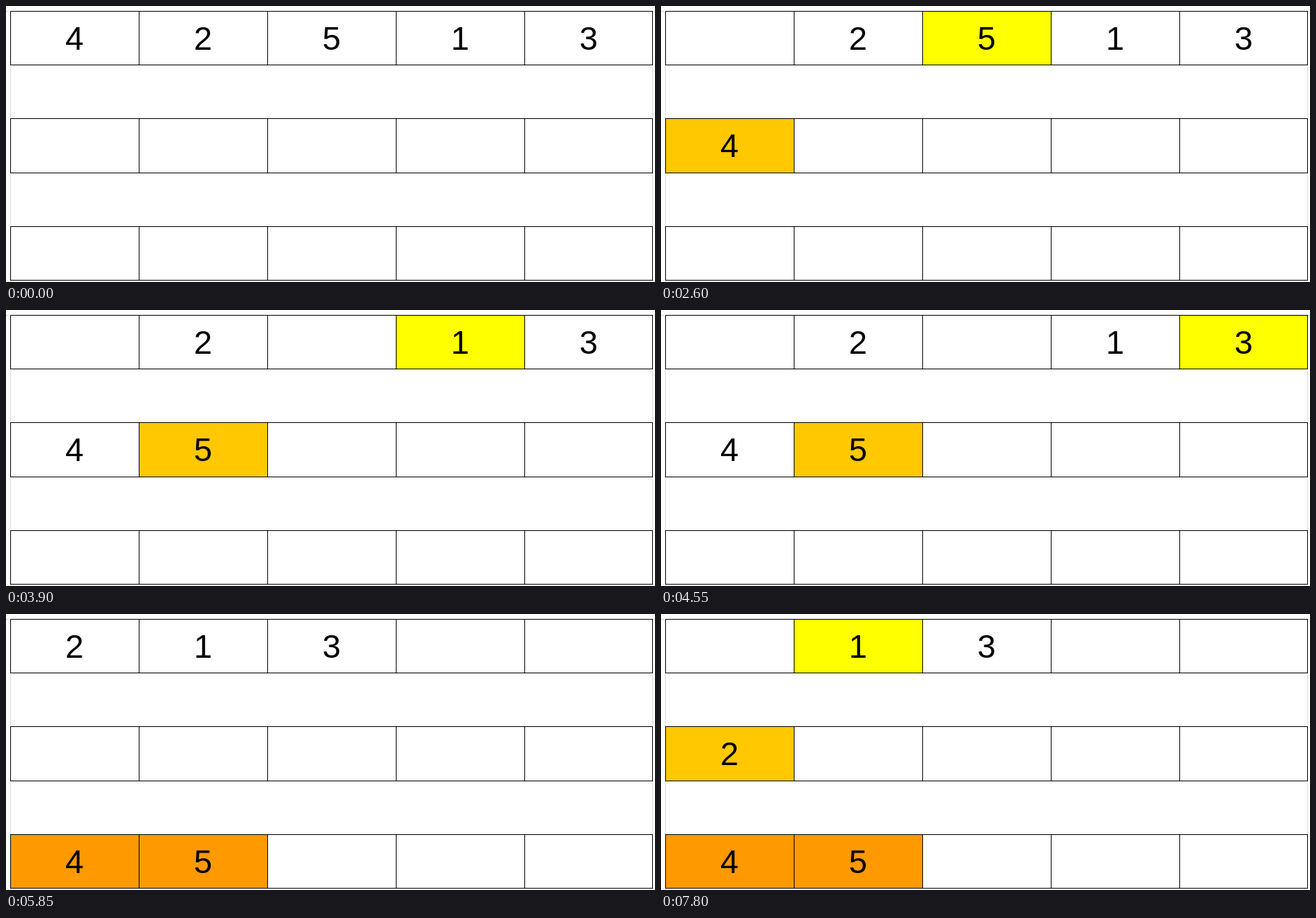
Write an HTML page that moves like this. It is 919 px wide and 391 px high and loops after 8000 ms.

```html
<!DOCTYPE html>
<html lang="en">
<head>
<meta charset="utf-8">
<title>Strand sort</title>
<style>
  html, body { margin: 0; width: 100%; height: 100%; overflow: hidden; background: #fff; }
  svg { display: block; }
  text { font: 46.67px "Liberation Sans", Arial, sans-serif; text-anchor: middle; }
  .rule { stroke: #000; shape-rendering: crispEdges; }
  .guide { stroke: #b4b4b4; stroke-dasharray: 1 1; shape-rendering: crispEdges; }
</style>
</head>
<body>
<svg width="919" height="391" viewBox="0 0 919 391">
  <g id="cells"></g>
  <g id="grid"></g>
</svg>
<script>
const STEP = 650, LOOP = 8000;
const xs = [6, 188, 370, 552, 734, 915];
const rows = [[7, 83], [159, 236], [312, 388]];
const fills = ['#ffff00', '#ffc800', '#ff9900'];

// Each step lists input / strand / output; * marks a highlighted cell, _ an empty one.
const steps = [
  '42513//',
  '4*2513//',
  '_*2513/4*/',
  '_2*513/4*/',
  '_25*13/4*/',
  '_2_*13/45*/',
  '_2_1*3/45*/',
  '_2_13*/45*/',
  '213/45*/',
  '213//4*5*',
  '2*13//4*5*',
  '_*13/2*/4*5*',
  '_1*3/2*/4*5*'
];

const line = (x1, y1, x2, y2, kind) =>
  `<line class="${kind}" x1="${x1}" y1="${y1}" x2="${x2}" y2="${y2}"/>`;

function drawGrid() {
  let out = '';
  for (const x of [6.5, 915.5]) out += line(x, 7, x, 391, 'guide');
  out += line(0, 7.5, 919, 7.5, 'guide');
  for (const [top, bottom] of rows) {
    for (const y of [top, bottom]) out += line(6, y + .5, 916, y + .5, 'rule');
    for (const x of xs) out += line(x + .5, top, x + .5, bottom + 1, 'rule');
  }
  return out;
}

function drawCells(step) {
  let out = '';
  step.split('/').forEach((row, r) => {
    const [top, bottom] = rows[r];
    (row.match(/.\*?/g) || []).forEach((cell, c) => {
      const x = xs[c], w = xs[c + 1] - x;
      if (cell[1]) out += `<rect x="${x}" y="${top}" width="${w}" height="${bottom - top}" fill="${fills[r]}"/>`;
      if (cell[0] !== '_') out += `<text x="${x + 91}" y="${top + 55}">${cell[0]}</text>`;
    });
  });
  return out;
}

const cells = document.getElementById('cells');
document.getElementById('grid').innerHTML = drawGrid();
let shown = -1;

function frame() {
  const i = Math.floor(performance.now() % LOOP / STEP);
  if (i !== shown) cells.innerHTML = drawCells(steps[shown = i]);
  requestAnimationFrame(frame);
}
frame();
</script>
</body>
</html>
```
